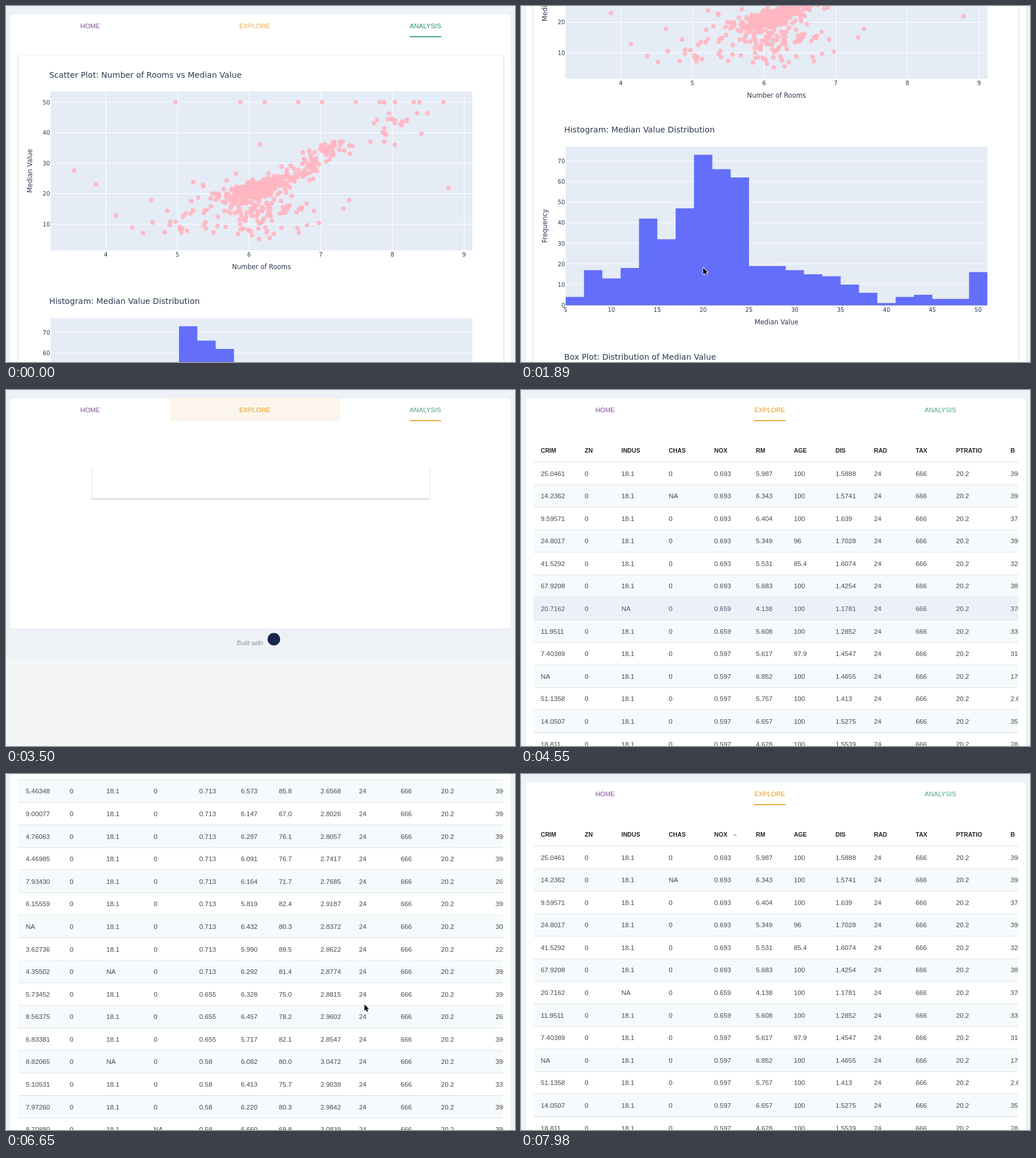
Animation of 895x625 px, one loop 8000 ms. Source, as an HTML page with a canvas:

```html
<!DOCTYPE html>
<html lang="en">
<head>
<meta charset="utf-8">
<title>Housing dashboard</title>
<style>
html, body { margin: 0; width: 100%; height: 100%; overflow: hidden; background: #f4f5f7; }
canvas { display: block; width: 895px; height: 625px; }
</style>
</head>
<body>
<canvas id="stage" width="895" height="625"></canvas>
<script>
const ctx = document.getElementById('stage').getContext('2d');
const LOOP = 8000, STEP = 70;
const SANS = '"Liberation Sans", Arial, sans-serif';
const PLOT = '"DejaVu Sans", Verdana, sans-serif';
const INK = '#2c3850', BLUE = '#636efa';

// ---------- helpers ----------
function random(seed) {
  return () => {
    seed = (seed + 0x6D2B79F5) | 0;
    let n = Math.imul(seed ^ (seed >>> 15), 1 | seed);
    n = (n + Math.imul(n ^ (n >>> 7), 61 | n)) ^ n;
    return ((n ^ (n >>> 14)) >>> 0) / 4294967296;
  };
}

// Smooth curve through [time, value] keys, flat at turning points.
function curve(keys, t) {
  const last = keys.length - 1;
  if (t <= keys[0][0]) return keys[0][1];
  if (t >= keys[last][0]) return keys[last][1];
  const slope = (a, b) => (b[1] - a[1]) / (b[0] - a[0]);
  const tangent = k => {
    if (k === 0 || k === last) return 0;
    const a = slope(keys[k - 1], keys[k]), b = slope(keys[k], keys[k + 1]);
    return a * b <= 0 ? 0 : 2 * a * b / (a + b);
  };
  let i = 0;
  while (t > keys[i + 1][0]) i++;
  const [t0, v0] = keys[i], [t1, v1] = keys[i + 1], d = t1 - t0, u = (t - t0) / d;
  const w = u * u * (3 - 2 * u);
  return v0 + (v1 - v0) * w + d * u * (1 - u) * ((1 - u) * tangent(i) - u * tangent(i + 1));
}

const ramp = (t, a, b) => Math.min(1, Math.max(0, (t - a) / (b - a)));
const range = (from, to, step) =>
  Array.from({ length: Math.round((to - from) / step) + 1 }, (_, i) => from + i * step);

// y is the middle of the capital letters
function text(str, x, y, size, color, align = 'left', family = PLOT, weight = '') {
  ctx.font = `${weight} ${size}px ${family}`;
  ctx.fillStyle = color;
  ctx.textAlign = align;
  ctx.fillText(str, x, y + size * 0.362);
}

function rect(x, y, w, h, color) {
  ctx.fillStyle = color;
  ctx.fillRect(x, y, w, h);
}

function line(x1, y1, x2, y2, color, width) {
  ctx.strokeStyle = color;
  ctx.lineWidth = width;
  ctx.beginPath();
  ctx.moveTo(x1, y1);
  ctx.lineTo(x2, y2);
  ctx.stroke();
}

function dot(x, y, r, color) {
  ctx.fillStyle = color;
  ctx.beginPath();
  ctx.arc(x, y, r, 0, 7);
  ctx.fill();
}

function card(x, y, w, h, r, shade, blur, drop) {
  ctx.save();
  ctx.shadowColor = `rgba(0,0,0,${shade})`;
  ctx.shadowBlur = blur;
  ctx.shadowOffsetY = drop;
  ctx.fillStyle = '#fff';
  ctx.beginPath();
  ctx.roundRect(x, y, w, h, r);
  ctx.fill();
  ctx.restore();
}

// ---------- page frame ----------
function page(bottom, end) {
  rect(0, 0, 895, end, '#eef2f7');
  card(8, 14.5, 879.5, bottom - 14.5, 4, 0.08, 2, 0.5);
  text('Built with', 406, bottom + 25, 11.5, '#8d939d', 'left', SANS);
  dot(471, bottom + 18.5, 11, '#16284f');
}

const TABS = [
  { name: 'HOME', x: 148, on: '#7a3c8f', off: '#874f9a' },
  { name: 'EXPLORE', x: 437.5, on: '#ea9a1c', off: '#e9ab48' },
  { name: 'ANALYSIS', x: 737.5, on: '#1c9279', off: '#4f9f8d' }
];

function tabs(active, lineX, hover) {
  ctx.globalAlpha = hover;
  rect(288, 14.5, 299.5, 40, '#fcf5eb');
  ctx.globalAlpha = 1;
  TABS.forEach((tab, i) => {
    const bright = i === active || (i === 1 && hover > 0);
    text(tab.name, tab.x, 34.8, 11.5, bright ? tab.on : tab.off, 'center', SANS);
  });
  rect(lineX - 28, 52.9, 55.8, 1.7, TABS[active].on);
}

// ---------- charts ----------
const LEFT = 78.5, RIGHT = 820, MID = (LEFT + RIGHT) / 2;

function plot(title, yTitle, top, bottom, titleY, ticks, yOf) {
  text(title, 76, titleY, 14.17, INK);
  rect(LEFT, top, RIGHT - LEFT, bottom - top, '#e5ecf6');
  for (const v of ticks) {
    line(LEFT, yOf(v), RIGHT, yOf(v), '#fff', 1);
    text(v, 77.3, yOf(v) + 0.3, 10, INK, 'right');
  }
  ctx.save();
  ctx.translate(42, (top + bottom) / 2);
  ctx.rotate(-Math.PI / 2);
  text(yTitle, 0, 0, 11.5, INK, 'center');
  ctx.restore();
}

// Clouds of points along sloping lines.
const CLOUDS = [
  { n: 250, x: 442, y: 322, slope: -0.22, w: 46, h: 14 },
  { n: 85, x: 445, y: 360, slope: -0.05, w: 68, h: 27 },
  { n: 80, x: 535, y: 277, slope: -0.62, w: 42, h: 23 },
  { n: 18, x: 582, y: 248, slope: 0, w: 18, h: 14 },
  { n: 16, x: 435, y: 396, slope: 0, w: 85, h: 12 },
  { n: 32, x: 332, y: 360, slope: -0.4, w: 42, h: 36 },
  { n: 24, x: 670, y: 208, slope: 0, w: 62, h: 28 }
];
const CAPPED = [298, 412, 455, 514, 556, 615, 657, 665, 684, 717, 727, 769];
const LONERS = [[120, 289], [158, 313], [193, 368], [222, 389], [241, 399], [255, 341],
  [258, 380], [778, 319], [603, 341], [593, 356], [550, 381], [446, 243]];

const points = (() => {
  const rnd = random(11);
  const bell = () => rnd() + rnd() + rnd() + rnd() - 2;
  const list = [...CAPPED.map(x => [x, 169]), ...LONERS];
  for (const c of CLOUDS) {
    for (let i = 0; i < c.n; i++) {
      const dx = bell() * c.w;
      list.push([c.x + dx, Math.min(409, c.y + dx * c.slope + bell() * c.h)]);
    }
  }
  return list;
})();

function scatter() {
  plot('Scatter Plot: Number of Rooms vs Median Value', 'Median Value', 150, 429, 120.5,
    range(10, 50, 10), v => 169 + (50 - v) * 5.35);
  for (const v of range(4, 9, 1)) {
    const x = 175.5 + (v - 4) * 126;
    line(x, 150, x, 429, '#fff', 1);
    text(v, x, 436.3, 10, INK, 'center');
  }
  text('Number of Rooms', MID, 458.3, 11.5, INK, 'center');
  for (const [x, y] of points) dot(x, y, 4, 'rgba(255,182,193,.92)');
}

const BINS = [4, 17, 13, 18, 42, 32, 47, 73, 66, 62, 19, 19, 17, 15, 14, 10, 6, 1, 4, 5, 3, 3, 16];

function histogram() {
  const base = 826.2, yOf = v => base - v * 3.617;
  plot('Histogram: Median Value Distribution', 'Frequency', 548, base, 518.3, range(0, 70, 10), yOf);
  const w = (RIGHT - LEFT) / BINS.length;
  ctx.beginPath();
  ctx.moveTo(LEFT, base);
  BINS.forEach((n, i) => {
    ctx.lineTo(LEFT + i * w, yOf(n));
    ctx.lineTo(LEFT + (i + 1) * w, yOf(n));
  });
  ctx.lineTo(RIGHT, base);
  ctx.fillStyle = BLUE;
  ctx.fill();
  line(LEFT, base, RIGHT, base, '#6a74c4', 0.8);
  for (const v of range(5, 50, 5)) text(v, LEFT + (v - 5) * w / 2, 834.3, 10, INK, 'center');
  text('Median Value', MID, 856.2, 11.5, INK, 'center');
}

const FLIERS = [50, 48.6, 39.8, 38.7, 37.6, ...range(41.3, 46.8, 0.5)];

function boxPlot() {
  const yOf = v => 960 + (50 - v) * 5.612, edge = '#5f6bc4';
  plot('Box Plot: Distribution of Median Value', 'Median Value', 946.3, 1226.5, 916.5,
    range(10, 50, 10), yOf);
  line(MID, yOf(37), MID, yOf(25), edge, 1.7);
  line(MID, yOf(17), MID, yOf(5), edge, 1.7);
  for (const v of [37, 5]) line(358.5, yOf(v), 540, yOf(v), edge, 1.7);
  ctx.fillStyle = 'rgba(99,110,250,.5)';
  ctx.fillRect(267.5, yOf(25), 363.5, yOf(17) - yOf(25));
  ctx.strokeRect(267.5, yOf(25), 363.5, yOf(17) - yOf(25));
  line(267.5, yOf(21.2), 631, yOf(21.2), edge, 1.7);
  for (const v of FLIERS) dot(MID, yOf(v), 2.6, '#636de8');
  text('Median Value', MID, 1234.2, 10, INK, 'center');
}

function analysis(t) {
  page(1294, 1341);
  tabs(2, 737.5, ramp(t, 3080, 3220));
  card(21.5, 87, 853, 1194, 3, 0.3, 3, 1);
  scatter();
  histogram();
  boxPlot();
}

// ---------- table ----------
const HEADS = 'CRIM ZN INDUS CHAS NOX RM AGE DIS RAD TAX PTRATIO B'.split(' ');
const COLS = [34.8, 112, 176.5, 259.7, 339.8, 413, 479.7, 553, 620.8, 694, 765, 860.8];
const ROW = 39.58, HEAD_LINE = 126.5, ROWS = 100;

// Opening rows: CRIM RM AGE DIS B; the rest are made up by rule.
const OPENING = `25.0461 5.987 100 1.5888 396|14.2362 6.343 100 1.5741 396|9.59571 6.404 100 1.639 376
24.8017 5.349 96 1.7028 396|41.5292 5.531 85.4 1.6074 329|67.9208 5.683 100 1.4254 384
20.7162 4.138 100 1.1781 370|11.9511 5.608 100 1.2852 332|7.40389 5.617 97.9 1.4547 314
NA 6.852 100 1.4655 179|51.1358 5.757 100 1.413 2.6|14.0507 6.657 100 1.5275 35
18.811 4.628 100 1.5539 28|28.6558 5.155 100 1.5894 210|45.7461 4.519 100 1.6582 88`
  .split(/[|\n]/).map(row => row.split(' '));
// first row of each run of equal NOX values
const NOX = [[0, 0.693], [6, 0.659], [8, 0.597], [14, 0.693], [15, 0.679], [24, 0.584],
  [35, 0.74], [48, 0.713], [64, 0.655], [67, 0.58]];

const rows = (() => {
  const rnd = random(5);
  const invent = i => [
    (3.6 + 5.6 * rnd()).toFixed(5),
    (5.7 + rnd()).toFixed(3),
    (65 + 30 * rnd()).toFixed(1),
    (1.6 + i * 0.019 + 0.2 * rnd()).toFixed(4),
    rnd() < 0.6 ? 396 : 220 + Math.floor(rnd() * 170)
  ];
  return range(0, ROWS - 1, 1).map(i => {
    const [crim, rm, age, dis, b] = OPENING[i] || invent(i);
    const nox = NOX.filter(run => run[0] <= i).pop()[1];
    const cells = [crim, 0, 18.1, 0, nox, rm, age, dis, 24, 666, 20.2, b];
    // a few missing values in the first four columns
    if (i === 1) cells[3] = 'NA';
    else if (i === 6) cells[2] = 'NA';
    else if (i > 14 && rnd() < 0.3) cells[Math.floor(rnd() * 4)] = 'NA';
    return cells;
  });
})();

function table(scroll, hoverRow, arrow) {
  ctx.save();
  ctx.beginPath();
  ctx.rect(21.5, 60, 853, 5000);
  ctx.clip();
  HEADS.forEach((h, i) => text(h, COLS[i], 106.2, 10.6, '#222', 'left', SANS, 'bold'));
  ctx.globalAlpha = arrow;
  ctx.fillStyle = '#aecde9';
  ctx.beginPath();
  ctx.moveTo(372, 108.7);
  ctx.lineTo(376.2, 104.3);
  ctx.lineTo(380.4, 108.7);
  ctx.fill();
  ctx.globalAlpha = 1;
  rect(21.5, HEAD_LINE - 0.5, 853, 1, '#dcdfe2');
  rows.forEach((cells, i) => {
    const y = HEAD_LINE + i * ROW;
    if (y > scroll + 640 || y + ROW < scroll - 10) return;
    const hot = i === hoverRow;
    if (hot || i % 2) rect(21.5, y + 0.5, 853, ROW - 1, hot ? '#edf1f7' : '#f5fafd');
    rect(21.5, y + ROW - 0.5, 853, 1, '#dcdfe2');
    cells.forEach((c, k) => text(c, COLS[k], y + 19.8, 11.75, hot ? '#46566e' : '#464646', 'left', SANS));
  });
  ctx.restore();
}

// Row under the pointer: it enters, rests, then leaves upwards after the scroll.
function hoverAt(t) {
  if (t < 4410 || (t >= 6020 && t < 7630)) return -1;
  if (t >= 7630) return 7 - 2 * Math.floor((t - 7630) / STEP);
  if (t < 4480) return 2;
  return t < 4550 || t >= 5530 ? 7 : 6;
}

function explore(t, scroll) {
  const loaded = t >= 3780;
  if (loaded) page(4200, 4253);
  else page(419, 472);
  const slide = ramp(t, 3500, 3760);
  const x = 737.5 - 300 * slide * slide * (3 - 2 * slide);
  tabs(1, x, 1 - ramp(t, 3850, 3990));
  if (loaded) {
    table(scroll, hoverAt(t), ramp(t, 7770, 7950));
  } else {
    ctx.save();
    ctx.beginPath();
    ctx.rect(140, 137, 620, 70);
    ctx.clip();
    card(151.3, 110, 593.4, 80.5, 2, 0.32, 2, 0.9);
    ctx.restore();
  }
}

// ---------- pointer ----------
const ARROW = new Path2D('M.3 0V11.2L2.9 8.9 4.8 13 6.6 12.2 4.8 8.2 8.2 8Z');

function pointer(x, y) {
  ctx.save();
  ctx.translate(x, y);
  ctx.strokeStyle = '#fff';
  ctx.lineWidth = 1.8;
  ctx.lineJoin = 'round';
  ctx.stroke(ARROW);
  ctx.fillStyle = '#000';
  ctx.fill(ARROW);
  ctx.restore();
}

// ---------- timeline ----------
const CHART_SCROLL = [[770, 0], [910, 270], [1050, 766], [1470, 716], [1610, 714], [1890, 301], [2450, 0]];
const TABLE_SCROLL = [[5880, 0], [5950, 81], [6300, 1080], [6650, 2293], [6860, 2500], [7300, 850], [7560, 0]];

function draw(t) {
  const charts = t < 3430;
  const scroll = curve(charts ? CHART_SCROLL : TABLE_SCROLL, t);
  rect(0, 0, 895, 625, '#f4f5f7');
  ctx.save();
  ctx.translate(0, -Math.round(scroll));
  if (charts) analysis(t);
  else explore(t, scroll);
  ctx.restore();
  if (t >= 840 && t <= 2450) pointer(320, 459.5);
  if (t >= 6020 && t <= 7560) pointer(630, 404.5);
}

const start = performance.now();
let shown = -1;
function tick() {
  const t = (performance.now() - start) % LOOP;
  const step = Math.floor(t / STEP) * STEP;
  if (step !== shown) draw(shown = step);
  requestAnimationFrame(tick);
}
tick();
</script>
</body>
</html>
```
